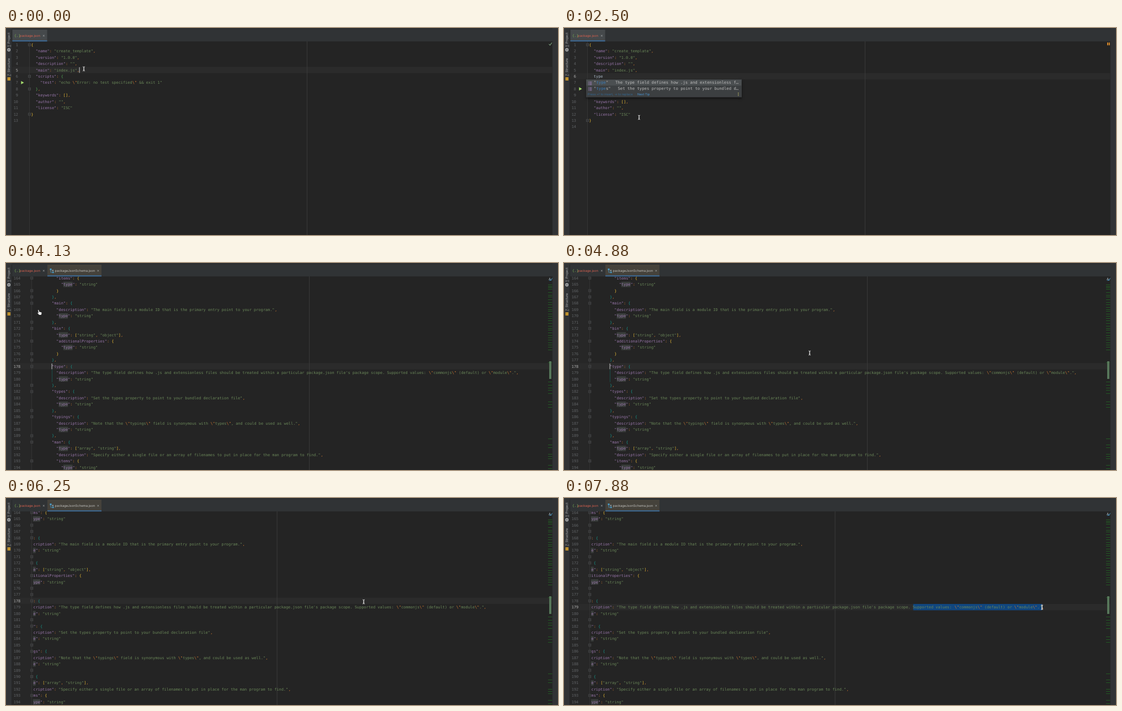
Recreate the animation shown at these times as an HTML page with a canvas. Size 1000x375 px, loop 8000 ms.

```html
<!DOCTYPE html>
<html lang="en">
<head>
<meta charset="utf-8">
<title>Editor walkthrough</title>
<style>
html, body { margin: 0; width: 100%; height: 100%; overflow: hidden; background: #242424; }
canvas { display: block; }
</style>
</head>
<body>
<canvas id="stage" width="1000" height="375"></canvas>
<script>
const ctx = document.getElementById('stage').getContext('2d');
const LOOP = 8000, TICK = 125, CHAR = 4.165, ROW = 11.43;
const MONO = '6.92px "DejaVu Sans Mono", monospace';
const POPUP = '7.28px "DejaVu Sans Mono", monospace';
const ui = size => `${size}px Inter, sans-serif`;
const KEY = '#9876aa', STRING = '#6a8759', PUNCT = '#cc7832', PLAIN = '#a9b7c6', YELLOW = '#e8ba36';
const BRACES = [YELLOW, '#54a857', '#359ff4', '#5060bb', '#179387'];

const packageHead = `{
  "name": "create_template",
  "version": "1.0.0",
  "description": "",
  "main": "index.js",`.split('\n');
const packageTail = String.raw`  "scripts": {
    "test": "echo \"Error: no test specified\" && exit 1"
  },
  "keywords": [],
  "author": "",
  "license": "ISC"
}
`.split('\n');
const schema = String.raw`  "items": {
    "type": "string"
  }
},
"main": {
  "description": "The main field is a module ID that is the primary entry point to your program.",
  "type": "string"
},
"bin": {
  "type": ["string", "object"],
  "additionalProperties": {
    "type": "string"
  }
},
"type": {
  "description": "The type field defines how .js and extensionless files should be treated within a particular package.json file's package scope. Supported values: \"commonjs\" (default) or \"module\".",
  "type": "string"
},
"types": {
  "description": "Set the types property to point to your bundled declaration file",
  "type": "string"
},
"typings": {
  "description": "Note that the \"typings\" field is synonymous with \"types\", and could be used as well.",
  "type": "string"
},
"man": {
  "type": ["array", "string"],
  "description": "Specify either a single file or an array of filenames to put in place for the man program to find.",
  "items": {
    "type": "string"`.split('\n').map(line => ' '.repeat(8) + line);

// Keyframes: tick, then values
const mouseKeys = [[0, 141, 74], [1, 108, 132], [2, 69, 198], [6, 69, 198], [9, 100, 194], [18, 100, 194],
  [20, 136, 162], [21, 136, 162], [25, 61, 86], [28, 61, 86], [29, 61, 90], [33, 61, 90], [39, 445, 163],
  [46, 445, 163], [50, 648, 188], [54, 632, 198], [56, 632, 198], [63, 866, 198]];
const scrollKeys = [[39, 0], [40, 22], [41, 50], [42, 56.5], [44, 58.5]];
const stripes = [39, 42, 44, 47, 53, 58, 61, 66, 71, 75, 80, 84, 87, 92, 96, 100, 104, 109, 114, 118, 121, 126,
  131, 135, 139, 144, 148, 152, 157, 180, 215, 221, 226, 230, 236, 251, 256, 261, 318, 329, 334, 346, 350, 354, 366, 372];

function sample(keys, k) {
  const i = keys.findIndex(key => key[0] > k);
  if (i === 0) return keys[0].slice(1);
  if (i < 0) return keys[keys.length - 1].slice(1);
  const a = keys[i - 1], b = keys[i], f = (k - a[0]) / (b[0] - a[0]);
  return a.slice(1).map((v, j) => v + (b[j + 1] - v) * f);
}
function rect(x, y, w, h, color) {
  ctx.fillStyle = color;
  ctx.fillRect(x, y, w, h);
}
function text(s, x, y, color, font = MONO, align = 'left') {
  ctx.font = font;
  ctx.textAlign = align;
  ctx.fillStyle = color;
  ctx.fillText(s, x, y);
}
function path(points, color, width) {
  ctx.beginPath();
  points.forEach(([x, y]) => ctx.lineTo(x, y));
  if (width) {
    ctx.strokeStyle = color;
    ctx.lineWidth = width;
    ctx.stroke();
  } else {
    ctx.fillStyle = color;
    ctx.closePath();
    ctx.fill();
  }
}
function clip(x, y, w, h, draw) {
  ctx.save();
  ctx.beginPath();
  ctx.rect(x, y, w, h);
  ctx.clip();
  draw();
  ctx.restore();
}

function codeLine(line, x0, y, link, mark) {
  const indent = line.search(/\S/);
  for (const { 0: token, index } of line.matchAll(/"(?:\\.|[^"\\])*"|[{}[\]:,]|\w+/g)) {
    const x = x0 + index * CHAR;
    if (token[0] === '"') {
      const isKey = line[index + token.length] === ':', name = token.slice(1, -1);
      const linked = isKey && name === link, w = name.length * CHAR;
      if (mark && isKey && name === 'type') rect(x + CHAR, y - 7.2, w, 9.6, '#3a3e3c');
      let column = 0;
      for (const part of linked ? ['"', name, '"'] : token.split(/(\\")/)) {
        const color = linked && part === name ? '#3592e8' : isKey ? KEY : part === '\\"' ? PUNCT : STRING;
        text(part, x + column * CHAR, y, color);
        column += part.length;
      }
      if (linked) rect(x + CHAR, y + 1, w, .8, '#3592e8');
    } else {
      const color = /[{}]/.test(token) ? BRACES[indent / 2 % 5] : /[[\]]/.test(token) ? YELLOW
        : /[:,]/.test(token) ? PUNCT : PLAIN;
      text(token, x, y, color);
    }
  }
}

function editor({ lines, first, top, gutter, scroll = 0, current, caret, selection, link, runLine, inSchema }) {
  const x0 = gutter + 3.3 - scroll, rowTop = n => top + (n - first) * ROW;
  rect(11, 24, gutter - 11, 351, '#272727');
  rect(11, rowTop(current), 979, ROW, '#2b2b2b');
  rect(gutter, 24, .8, 351, '#3a3a3a');
  clip(gutter + 2.5, 24, 990 - gutter, 351, () => {
    rect(x0 + 120 * CHAR - .4, 24, .9, 351, '#3d3d3d');
    if (selection) rect(x0 + selection[0] * CHAR, rowTop(current), (selection[1] - selection[0]) * CHAR, ROW, '#10467f');
    if (inSchema) rect(x0 + 8 * CHAR, rowTop(179), .7, 2 * ROW, '#17645d');
    lines.forEach((line, i) => {
      const n = first + i;
      codeLine(line, x0, rowTop(n) + 8.3, link, inSchema && n !== 178);
    });
    if (caret != null) rect(x0 + caret * CHAR - .4, rowTop(current) + .7, 1, ROW - 1.2, '#d0d0d0');
  });
  lines.forEach((line, i) => {
    const n = first + i, mid = rowTop(n) + 5.7;
    text(n, gutter - 20.2, mid + 2.6, n === current ? '#b0b0b0' : '#606366', MONO, 'right');
    if (/\{$|^\s*\}/.test(line)) {
      rect(gutter - 2, mid - 2.3, 4.8, 4.8, '#505254');
      rect(gutter - 1.3, mid - 1.6, 3.4, 3.4, '#272727');
      rect(gutter - .7, mid - .2, 2.2, .6, '#646668');
    }
    if (n === runLine) path([[27.3, mid - 3], [32.6, mid], [27.3, mid + 3]], '#a5dc6c');
  });
}

function tab(x, w, name, color, active, fill) {
  if (active) {
    rect(x, 3, w, 21, fill);
    rect(x, 22.5, w, 1.8, '#3d6f9f');
  }
  text(name, x + 13.5, 16, color, ui(5.85));
  text('×', x + w - 6.3, 16.2, '#a0a3a5', ui(7), 'center');
}
function frameParts(inSchema) {
  rect(0, 0, 1000, 24.3, '#303335');
  rect(0, 0, 1000, 2.5, '#2b2d2f');
  rect(0, 0, 10.5, 375, '#313335');
  rect(10, 3, .8, 372, '#242526');
  rect(990, 0, 10, 375, '#313335');
  rect(989.5, 24, .7, 351, '#282a2b');
  tab(11.5, 63, 'package.json', '#d8604f', !inSchema, '#45494b');
  text('{.}', 15, 15.8, '#79ad55', '6.4px "DejaVu Sans Mono", monospace');
  if (inSchema) {
    tab(75, 98, 'packageJsonSchema.json', '#c0c0bd', true, '#45423b');
    rect(79.5, 10, 3, 3, '#4a9ac6');
    path([[81, 12], [81, 17], [86, 17]], '#4a9ac6', .8);
    rect(83.5, 12.5, 2.6, 2.2, '#8a9ba5');
    rect(84, 15.6, 2.6, 2.6, '#4a9ac6');
  }
  [['1: Project', 34], ['7: Structure', 87]].forEach(([label, y]) => {
    ctx.save();
    ctx.translate(7.3, y);
    ctx.rotate(-Math.PI / 2);
    text(label, 0, 0, '#b4b6b8', ui(5.9));
    rect(0, 1, 3, .5, '#b4b6b8');
    ctx.restore();
  });
  ctx.beginPath();
  ctx.arc(5.2, 39.5, 2.3, 0, 7);
  ctx.strokeStyle = '#c4c6c8';
  ctx.lineWidth = 1.2;
  ctx.stroke();
  rect(4.4, 38.7, 1.6, 1.6, '#c4c6c8');
  rect(2.5, 89.5, 5.6, 2.4, '#e0a72c');
  rect(2.5, 92.5, 5.6, 2.4, '#e0a72c');
}
function status(kind) {
  if (kind === 'ok') path([[983.5, 29], [985.5, 31.2], [989, 26.5]], '#7fa883', 1.1);
  else if (kind === 'warning') [984, 986.9].forEach(x => rect(x, 26.3, 2, 5, '#d98a2b'));
  else {
    text('A', 983, 31, '#b5c4cc', ui(6));
    path([[984, 32], [986, 30.5], [987, 32], [989.5, 27.5]], '#4a9fd0', 1);
    stripes.forEach(y => rect(982, y, 7.5, .9, '#236024'));
    rect(984, 178, 4, 32, '#57775a');
  }
}

function popup() {
  ctx.save();
  ctx.shadowColor = 'rgba(0,0,0,.5)';
  ctx.shadowBlur = 4;
  ctx.shadowOffsetY = 2;
  rect(40, 93, 282, 32.5, '#3c3f41');
  ctx.restore();
  rect(40.5, 94, 281, 10.3, '#4b4f51');
  const w = 4.385;
  [['', 93, 'The type field defines how .js and extensionless f…'],
   ['s', 97.5, 'Set the types property to point to your bundled d…']].forEach(([suffix, x, info], i) => {
    const y = 101.4 + i * 10.2;
    [-4, -1.6, .8].forEach(dy => {
      rect(44, y + dy, 1.4, 1, '#a083bd');
      rect(46.2, y + dy, 4.2, 1, '#a083bd');
    });
    text('"', 54, y, '#bbbbbb', POPUP);
    text('type', 54 + w, y, '#3a79b4', POPUP);
    text(suffix + '"', 54 + 5 * w, y, '#bbbbbb', POPUP);
    text(info, x, y, '#bbbbbb', POPUP);
  });
  text('Press ⏎ to insert, → to replace', 43, 122, '#33668f', ui(5.6));
  text('Next Tip', 133, 122, '#4a97d6', ui(5.6));
  [117, 119.3, 121.6].forEach(y => rect(315.2, y, 1.2, 1.2, '#c9c56d'));
}

function pointer(x, y, hand) {
  if (hand) {
    const shape = [[-3, -5], [-1.8, -5], [-.8, -1.5], [3, -.8], [3.6, .5], [2.8, 4], [-1, 4], [-4, .5], [-3.3, 0], [-2, 1]]
      .map(([dx, dy]) => [x + dx, y + dy]);
    path([...shape, shape[0]], '#222', 1.4);
    path(shape, '#f2f2f2');
    return;
  }
  for (const side of [-1, 1]) {
    path([[x + side * 2, y - 4], [x, y - 3.2], [x, y + 3.2], [x + side * 2, y + 4]], '#d8d8d8', .9);
  }
  rect(x - 1.2, y + .8, 2.4, .7, '#d8d8d8');
}

function draw(k) {
  const inSchema = k >= 33, [mx, my] = sample(mouseKeys, k);
  rect(0, 0, 1000, 375, '#242424');
  if (inSchema) {
    const selecting = k >= 54, end = Math.round(154 + Math.max(0, k - 56) * 8);
    editor({
      lines: schema, first: 164, top: 21.4 - (k >= 47 ? .9 : 0), gutter: 46.4, inSchema,
      scroll: sample(scrollKeys, k)[0], current: selecting ? 179 : 178,
      caret: selecting ? end : 8, selection: selecting && [154, end]
    });
  } else {
    const typed = 'type'.slice(0, Math.max(0, Math.floor((k - 10) / 2)));
    const added = k < 6 ? [] : ['  ' + (k < 21 ? typed : '"type": "",')];
    editor({
      lines: [...packageHead, ...added, ...packageTail], first: 1, top: 24.6, gutter: 42.2,
      current: k < 6 ? 5 : 6, runLine: k < 6 ? 7 : 8,
      caret: k < 6 ? 21 : k >= 21 ? 11 : k < 19 ? 2 + typed.length : null,
      link: k < 26 ? '' : k < 29 ? 'main' : 'type'
    });
  }
  frameParts(inSchema);
  status(inSchema ? 'schema' : k >= 12 && k < 21 ? 'warning' : 'ok');
  if (k >= 14 && k < 21) popup();
  pointer(mx, my, k >= 26 && k < 34);
}

ctx.textRendering = 'geometricPrecision';
const start = performance.now();
function loop() {
  draw(Math.floor((performance.now() - start) % LOOP / TICK));
  requestAnimationFrame(loop);
}
loop();
</script>
</body>
</html>
```
